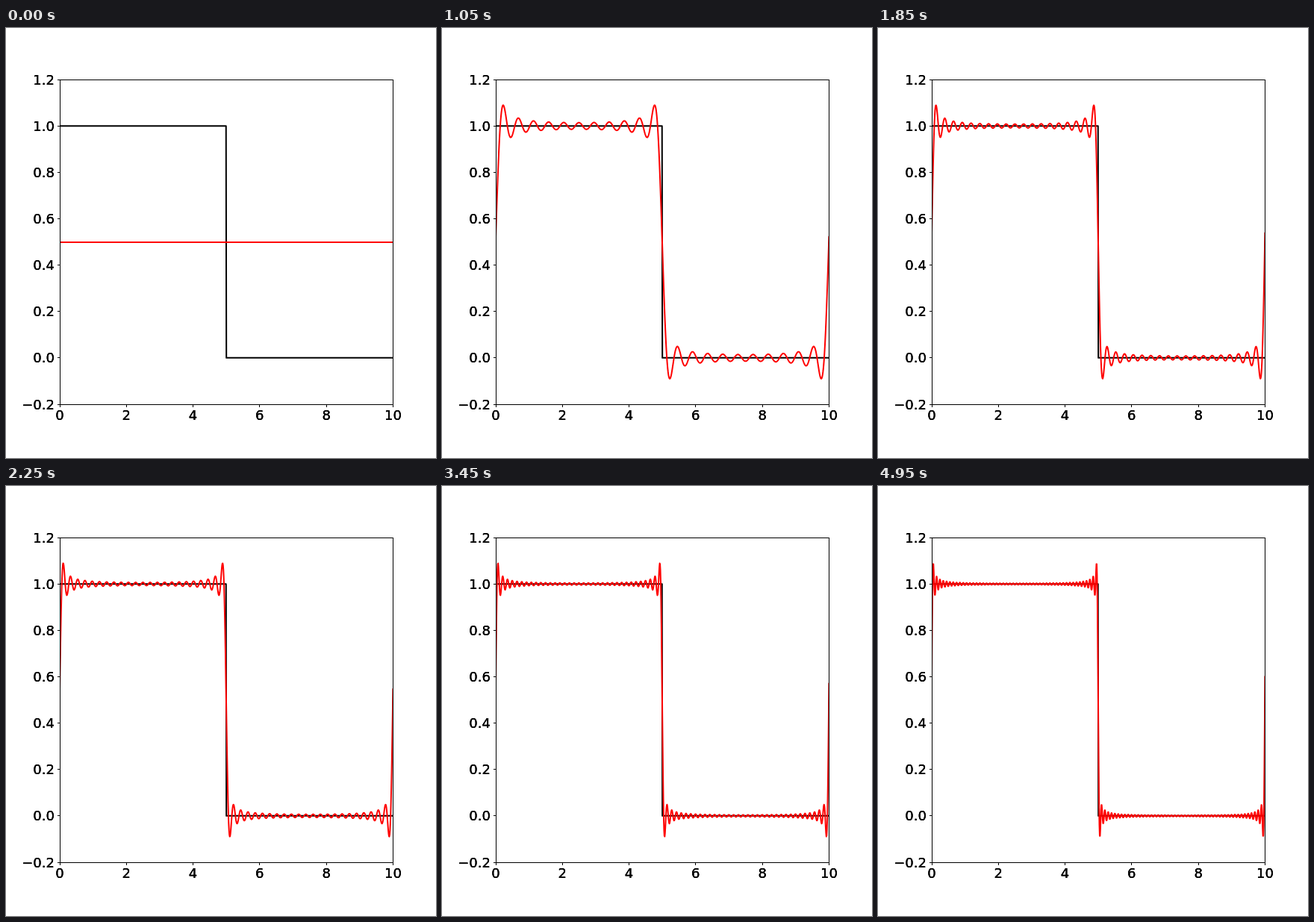
An HTML page with a canvas that plays this animation: 576x576 px, repeating every 5050 ms.

```html
<!DOCTYPE html>
<html lang="en">
<head>
<meta charset="utf-8">
<title>Fourier series of a square wave</title>
<style>
  html, body { margin: 0; width: 100%; height: 100%; overflow: hidden; background: #fff; }
  canvas { display: block; width: 576px; height: 576px; }
</style>
</head>
<body>
<canvas id="stage" width="576" height="576"></canvas>
<script>
const ctx = document.getElementById('stage').getContext('2d');
const SIZE = 576, LOOP = 5050, STEP = 100;
const LEFT = 72, RIGHT = 518.4, TOP = 69.12, BOTTOM = 504;
const SAMPLES = 1000;

const px = x => LEFT + (RIGHT - LEFT) * x / 10;
const py = y => BOTTOM - (BOTTOM - TOP) * (y + 0.2) / 1.4;

const square = i => i < SAMPLES / 2 ? 1 : 0;

// Partial sum with coefficients of the sampled wave; only odd harmonics remain.
function partialSum(i, terms) {
  let sum = 0.5;
  for (let j = 0; j < terms; j++) {
    const n = 2 * j + 1;
    const angle = 2 * Math.PI * n * i / SAMPLES;
    const sine = 1 / Math.tan(Math.PI * n / SAMPLES);
    sum += 2 / SAMPLES * (Math.cos(angle) + sine * Math.sin(angle));
  }
  return sum;
}

function plot(valueAt, color) {
  ctx.beginPath();
  for (let i = 0; i <= SAMPLES; i++) {
    ctx.lineTo(px(10 * i / SAMPLES), valueAt(i));
  }
  ctx.strokeStyle = color;
  ctx.lineWidth = 2;
  ctx.lineJoin = 'round';
  ctx.lineCap = 'square';
  ctx.stroke();
}

function label(text, x, y, align) {
  ctx.textAlign = align;
  // Repeated passes give the heavy glyph edges.
  for (let pass = 0; pass < 3; pass++) ctx.fillText(text, x, y);
}

function drawAxes() {
  const left = 72, right = 518, top = 69, bottom = 504;
  ctx.fillStyle = '#000';
  ctx.fillRect(left, top, right - left + 1, 1);
  ctx.fillRect(left, bottom, right - left + 1, 1);
  ctx.fillRect(left, top, 1, bottom - top + 1);
  ctx.fillRect(right, top, 1, bottom - top + 1);

  ctx.font = '18px "DejaVu Sans", sans-serif';
  ctx.textBaseline = 'alphabetic';
  for (let x = 0; x <= 10; x += 2) {
    ctx.fillRect(Math.floor(px(x)), bottom, 1, 4);
    label(String(x), px(x), 525, 'center');
  }
  for (let k = -1; k <= 6; k++) {
    const y = py(k / 5);
    ctx.fillRect(left - 3, Math.floor(y), 3, 1);
    label((k / 5).toFixed(1).replace('-', '\u2212'), 65, Math.round(y + 6.5), 'right');
  }
}

function draw(terms) {
  ctx.fillStyle = '#fff';
  ctx.fillRect(0, 0, SIZE, SIZE);
  ctx.save();
  ctx.beginPath();
  ctx.rect(LEFT, 69, 446, 435);
  ctx.clip();
  plot(i => py(square(i)), '#000');
  plot(i => terms ? py(partialSum(i, terms)) : Math.round(py(0.5)), '#f00');
  ctx.restore();
  drawAxes();
}

const start = performance.now();
let shown = -1;

function tick() {
  const time = (performance.now() - start) % LOOP;
  const terms = Math.floor((time + STEP / 2) / STEP);
  if (terms !== shown) {
    draw(terms);
    shown = terms;
  }
  requestAnimationFrame(tick);
}
tick();
</script>
</body>
</html>
```
